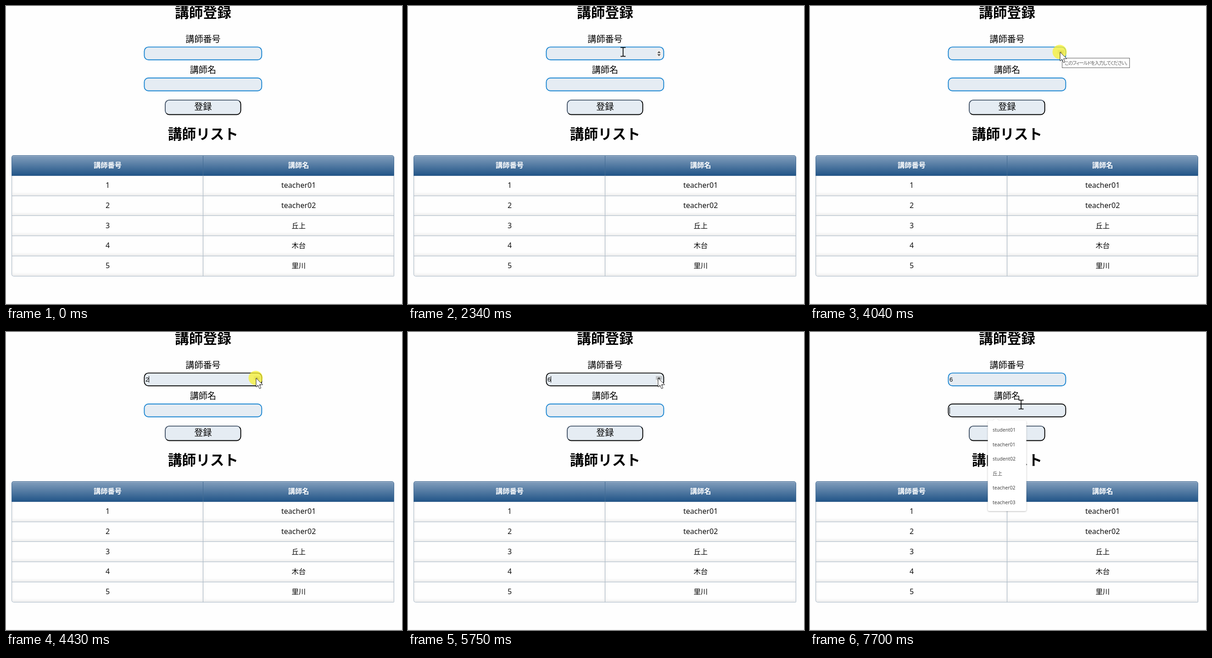
Write an HTML page that moves like this. It is 863x649 px and loops after 8 s.

```html
<!DOCTYPE html>
<html lang="ja">
<head>
<meta charset="utf-8">
<style>
  html, body { margin: 0; width: 100%; height: 100%; overflow: hidden; background: #fefefe; }
  svg { position: absolute; left: 0; top: 0; }
  .cell { position: absolute; box-sizing: border-box; }
  .head { background: linear-gradient(#829ebc, #225588); border: solid #3c6690; border-width: 1px 0 1px 1px;
    box-shadow: inset 0 1px 1px rgba(255,255,255,.3); }
  .body { background: #fefefe; border: solid #a8b7c5; border-width: 0 0 1px 1px; box-shadow: inset 0 -3px 5px 1px #eee; }
  .right { border-right-width: 1px; }
  text { font-family: "Noto Sans CJK JP", "Noto Sans CJK", sans-serif; fill: #000; }
  .mid { text-anchor: middle; }
  .title { font-size: 30.7px; font-weight: 700; }
  .label { font-size: 19.1px; font-weight: 350; }
  .th { font-size: 15.3px; font-weight: 700; fill: #fff; }
  .td { font-size: 15.3px; font-weight: 350; }
  .latin { font-family: "Noto Sans", sans-serif; font-size: 16px; fill: #111; }
  .option { font: 10.5px "Noto Sans", "Noto Sans CJK JP", sans-serif; fill: #444; }
  .value { font: 13px "Liberation Sans", sans-serif; }
  .tip { font-size: 10.5px; letter-spacing: -1.1px; font-feature-settings: "palt"; fill: #5c5c5c; }
  .field { fill: #e5ecf3; stroke-width: 1.9; }
</style>
</head>
<body>
<div id="table"></div>
<svg id="stage" width="863" height="649" viewBox="0 0 863 649">
  <path d="M0 648.5H863" stroke="#eee"/>
  <text class="mid title" x="429.5" y="25">講師登録</text>
  <text class="mid label" x="429.5" y="78.8">講師番号</text>
  <rect id="field1" class="field" x="301.4" y="89.4" width="255.9" height="27.9" rx="9"/>
  <text class="mid label" x="429.5" y="146.2">講師名</text>
  <rect id="field2" class="field" x="301.4" y="156.8" width="255.9" height="27.9" rx="9"/>
  <g fill="none" stroke-width="1.9" transform="translate(0 .3)">
    <rect x="347" y="204.6" width="164.6" height="31.6" rx="9" fill="#e5ecf3"/>
    <path d="M349.6 233.6A9 9 0 0 1 347 227.2V213.6A9 9 0 0 1 356 204.6H502.6A9 9 0 0 1 509 207.2" stroke="#46566a"/>
    <path d="M509 207.2A9 9 0 0 1 511.6 213.6V227.2A9 9 0 0 1 502.6 236.2H356A9 9 0 0 1 349.6 233.6" stroke="#000"/>
  </g>
  <text class="mid label" x="429.3" y="226.3">登録</text>
  <text class="mid title" x="429.5" y="290">講師リスト</text>
  <g id="labels"></g>
  <text id="value" class="value" x="304" y="108"></text>
  <path id="caret1" d="M311.5 96V110" stroke="#000"/>
  <path id="caret2" d="M304.5 164V178" stroke="#000"/>
  <g id="spin">
    <rect x="540.5" y="95.5" width="13" height="17" rx="2" fill="#efefef"/>
    <rect id="spinUp" x="540" y="96" width="14" height="8" fill="#c3c7ca"/>
    <path d="M543.4 102.4L547 98.2L550.6 102.4ZM543.4 105L547 109.2L550.6 105Z" fill="#4c4c4c"/>
  </g>
  <g id="list">
    <path d="M391 193H398.5L405 187L411.5 193H468Q471.5 193 471.5 196.5V386.5Q471.5 390 468 390H391Q387.5 390 387.5 386.5V196.5Q387.5 193 391 193Z"
      fill="#fff" style="filter:drop-shadow(0 1px 1.5px rgba(0,0,0,.28))"/>
  </g>
  <g id="tip">
    <rect x="549.5" y="113.5" width="147" height="21" fill="#fff" stroke="#5a5a5a"/>
    <text class="tip" x="555" y="128">このフィールドを入力してください。</text>
  </g>
  <circle id="halo" r="15.5" fill="#f8f130" opacity=".74"/>
  <path id="arrow" d="M.5.5V20L4.7 16L8 23.4L11.2 22L8 14.8H15Z" fill="#fff" stroke="#222"/>
  <path id="beam" d="M-5.5 -9.7H-1.5L0 -9L1.5 -9.7H5.5M0 -9V9M-5.5 9.7H-1.5L0 9L1.5 9.7H5.5"
    fill="none" stroke="#000" stroke-width="1.7"/>
</svg>
<script>
const LOOP = 8000;
const el = Object.fromEntries([...document.querySelectorAll('[id]')].map(e => [e.id, e]));

const addText = (parent, cls, x, y, str) => {
  const node = document.createElementNS('http://www.w3.org/2000/svg', 'text');
  node.setAttribute('class', cls);
  node.setAttribute('x', x);
  node.setAttribute('y', y);
  node.textContent = str;
  parent.append(node);
};

const columns = [[12, 429], [429, 846]];
const addRow = (kind, top, bottom, radii) => columns.forEach(([x0, x1], i) => {
  const cell = document.createElement('div');
  cell.className = `cell ${kind}${i ? ' right' : ''}`;
  cell.style.cssText = `left:${x0}px;top:${top}px;width:${x1 - x0}px;height:${bottom - top}px;border-radius:${radii[i]}`;
  el.table.append(cell);
});

const names = ['teacher01', 'teacher02', '丘上', '木台', '里川'];
const rowTop = i => Math.round(369.9 + 43.75 * i);
addRow('head', 325, rowTop(0), ['5px 0 0 0', '0 5px 0 0']);
names.forEach((name, i) => {
  const last = i === names.length - 1;
  addRow('body', rowTop(i), rowTop(i + 1), last ? ['0 0 0 5px', '0 0 2px 0'] : [0, 0]);
  const y = 396 + 43.75 * i;
  addText(el.labels, 'mid latin', 221.5, y, i + 1);
  addText(el.labels, i < 2 ? 'mid latin' : 'mid td', 637.7, y, name);
});
addText(el.labels, 'mid th', 221.5, 352, '講師番号');
addText(el.labels, 'mid th', 637.7, 352, '講師名');
['student01', 'teacher01', 'student02', names[2], 'teacher02', 'teacher03']
  .forEach((s, i) => addText(el.list, 'option', 398, 217 + 31.5 * i, s));

// Pointer moves: first step, last step, step count, end point, optional bend point
const start = [837, 654];
const moves = [
  [560, 720, 3, [795, 558]],
  [1100, 1490, 6, [615, 94], [925, 220]],
  [1570, 1880, 5, [445, 92]],
  [1950, 2030, 2, [426, 93]],
  [2180, 2340, 3, [468.7, 100]],
  [2570, 2950, 6, [541.5, 100]],
  [3120, 3120, 1, [542, 100]],
  [3650, 3890, 4, [544.5, 100]],
  [5980, 6290, 5, [460, 158]],
];
const clicks = [[4040, 4280], [4430, 4510], [4590, 4670], [4750, 4830], [4980, 5060], [5670, 5750], [6610, 6760]];
const counts = [4130, 4430, 4590, 4750, 4980, 5670];

const within = (t, a, b) => t >= a && t < b;
const stepped = (t, a, b, n) => t < a ? 0 : n === 1 ? 1 : Math.min(n, Math.floor((t - a) / ((b - a) / (n - 1)) + 1.02)) / n;
const show = (node, on) => node.setAttribute('visibility', on ? 'visible' : 'hidden');

function pointer(t) {
  let from = start, pos = start;
  for (const [a, b, n, to, bend] of moves) {
    if (t < a) break;
    const p = stepped(t, a, b, n), q = 1 - p;
    pos = from.map((v, i) => bend ? q * q * v + 2 * q * p * bend[i] + p * p * to[i] : q * v + p * to[i]);
    from = to;
  }
  return pos;
}

function draw(t) {
  const [x, y] = pointer(t);
  const visible = t >= 560;
  const inX = within(x, 300, 558);
  const over1 = inX && within(y, 89, 118);
  const over2 = inX && within(y, 156, 185);
  const onSpin = over1 && x > 541.8;
  const beam = over2 || (over1 && !onSpin);
  const focus1 = within(t, 4130, 6690);
  const focus2 = t >= 6690;

  show(el.arrow, visible && !beam);
  show(el.beam, visible && beam);
  for (const node of [el.arrow, el.beam]) node.setAttribute('transform', `translate(${x} ${y})`);

  show(el.halo, clicks.some(([a, b]) => within(t, a, b)));
  el.halo.setAttribute('transform', `translate(${over2 ? x - 2 : x - .5} ${over2 ? y - 1 : y})`);

  el.field1.setAttribute('stroke', focus1 ? '#0a0a0a' : '#1c86d1');
  el.field2.setAttribute('stroke', focus2 ? '#0a0a0a' : '#1c86d1');
  show(el.spin, over1 || focus1);
  el.spinUp.setAttribute('opacity', onSpin ? 1 : 0);
  el.value.textContent = counts.filter(c => t >= c).length || '';
  show(el.caret1, within(t, 4130, 5520) || within(t, 5670, 6210));
  show(el.caret2, within(t, 6690, 7150) || t >= 7700);

  el.tip.setAttribute('opacity', t < 4130 ? stepped(t, 3650, 3890, 4) : 0);
  show(el.list, focus2);
}

const origin = performance.now();
function tick() {
  draw((performance.now() - origin) % LOOP);
  requestAnimationFrame(tick);
}
tick();
</script>
</body>
</html>
```
